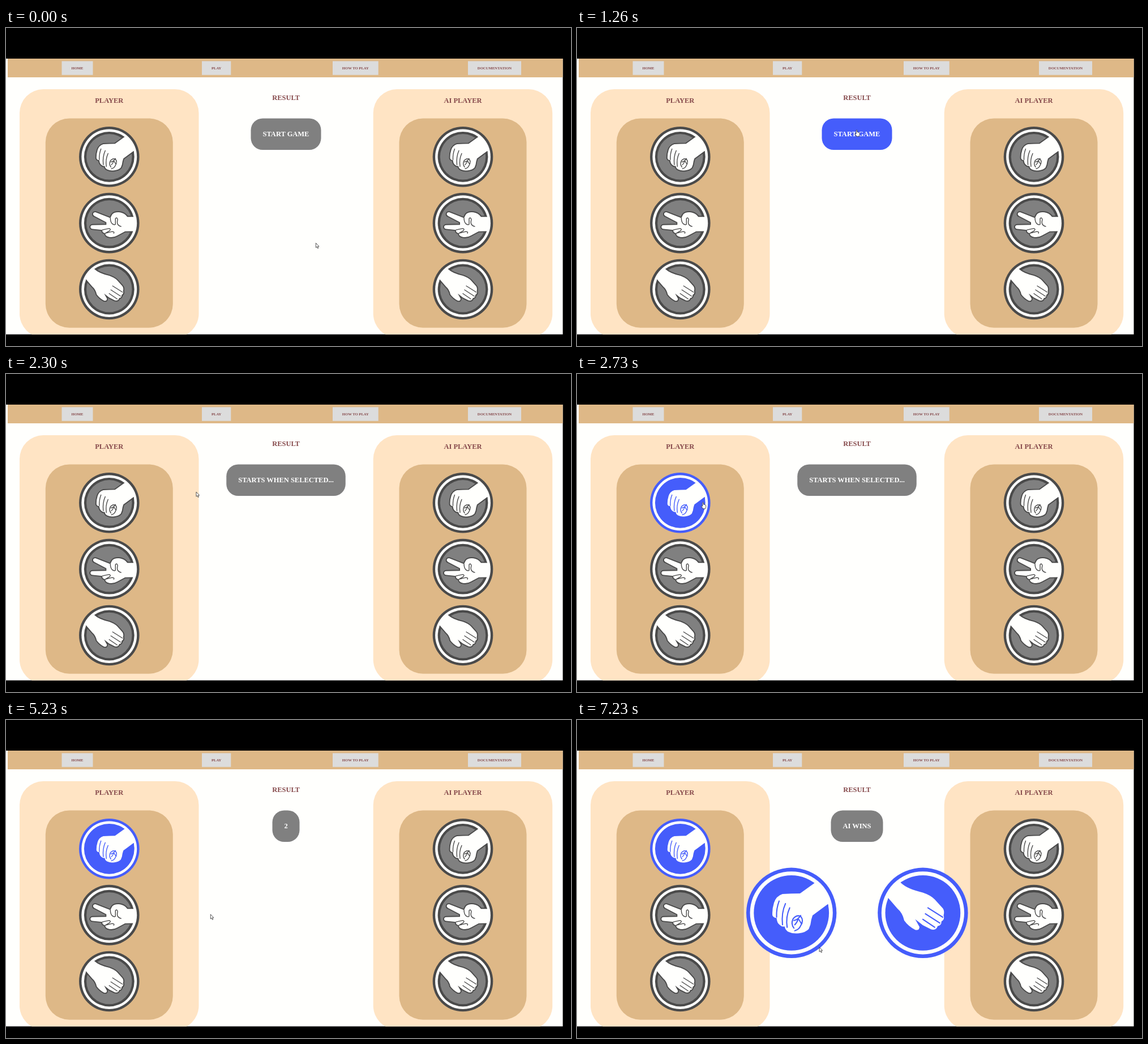
An HTML page for the animation above (8 s loop, 998 by 561 pixels).

```html
<!DOCTYPE html>
<html lang="en">
<head>
<meta charset="utf-8">
<title>Rock paper scissors</title>
<style>
html, body { margin: 0; width: 100%; height: 100%; overflow: hidden; background: #000; }
svg { display: block; width: 100vw; height: 100vh; }
text { font: bold 12.48px "Liberation Serif", "Times New Roman", serif; text-anchor: middle; fill: #85484a; }
.nav text { font-size: 6.65px; }
.icon { color: #4a4a4a; --disc: #808080; }
.icon.on { color: #455dfb; --disc: #455dfb; }
.line { fill: none; stroke: currentColor; stroke-width: 1.4; stroke-linecap: round; stroke-linejoin: round; }
.edge { fill: none; stroke: currentColor; stroke-width: 3.8; stroke-linejoin: round; }
.cursor path { fill: #fff; stroke: #222; stroke-width: .75; stroke-linejoin: round; }
</style>
</head>
<body>
<svg id="stage" viewBox="0 0 998 561"></svg>
<script>
const HANDS = {
  rock: {
    shape: 'M40 -45L27 -35L10.2 -23Q0 -23 -10.5 -22.3Q-18 -20 -20.5 -12Q-23 -4 -22.4 3Q-21 6 -17.5 6Q-17 12 -14 14Q-11 17 -8 16Q-7 21 -3 22.5Q2 25 9 24Q17 23 20.5 19Q23 14 23.5 8L25 3L44 -11L55 -19Z',
    lines: 'M-14.5 -14Q-18 -5 -17.5 5M-7 -11Q-12 0 -10.5 14M-2 -6Q-7 5 -5 17M3 18Q-1 13 2 7Q6 2 11 4Q15 9 11 15Q9 20 4 21M3 9Q8 8 11 3M8 7Q7 11 4 14M9 8L12 13'
  },
  scissors: {
    shape: 'M55 -11L32 -11Q27 -18 19 -19Q9 -20 5 -15L2 -9L-23.5 -19Q-28 -19.5 -28.5 -16Q-28.5 -13.5 -26 -12.5L-5 -1.5L-5 3L-29.5 3.5Q-33.5 4 -33 7.5Q-32.5 10 -29 10.3L-12 12Q-13 17 -7 18Q-7 23 0 24.5Q7 26 14 22L28 14.5L55 14Z',
    lines: 'M2 -9Q2 -3 5 1Q9 4 11 2L11 -8Q14 -11 15 -6Q12 4 21 6M-12 12L0 9.5Q4 11 0 14L-7 18L5 15Q10 15 8 18'
  },
  paper: {
    shape: 'M-34 -43L-26 -35.5Q-18 -28 0 -24Q9 -21 14 -16L23 -6Q26 -3 24.5 3Q26 8 22 10Q22 15 17.5 15.5Q16 21 10 19.5L0 14.5L-9 7.5L-4 16.5Q-4 21 -9 20Q-17 16 -22 9Q-24 0 -30 -5L-42 -19L-54 -32Z',
    lines: 'M6 -6L23.5 5M3 1L20 12M0 7.5L14 17'
  }
};
const NAV = [['HOME', 98.5, 55], ['PLAY', 346, 51.3], ['HOW TO PLAY', 577, 80.7], ['DOCUMENTATION', 816, 94]];
const PANEL_GAP = 624.7, LOOP = 8000, SIZE = 1.495;

// Each move: start time, end time, start point, end point
const MOVES = [
  [510, 830, [547, 379], [511, 224]],
  [1110, 1260, [511, 224], [494, 179.5]],
  [1710, 1800, [494, 179.5], [490, 185.5]],
  [2045, 2500, [490, 185.5], [230, 223]],
  [2660, 2930, [230, 223], [187, 240.5]],
  [3885, 4220, [187, 240.5], [361, 342.5]],
  [5740, 6060, [361, 342.5], [427.8, 400.5]]
];
const LABELS = [
  [0, 'START GAME', 124], [1530, 'STARTS WHEN SELECTED...', 210.5],
  [4215, '3', 48], [5230, '2', 48], [6230, '1', 48], [7230, 'AI WINS', 92]
];

const rect = (x, y, w, h, r, fill, extra = '') =>
  `<rect x="${x}" y="${y}" width="${w}" height="${h}" rx="${r}" fill="${fill}" ${extra}/>`;
const text = (x, y, label, extra = '') => `<text x="${x}" y="${y}" ${extra}>${label}</text>`;
const disc = (r, fill) => `<circle r="${r}" fill="${fill}"/>`;

function icon(kind, x, y, scale = 1, extra = '') {
  const { shape, lines } = HANDS[kind];
  return `<g class="icon${scale > 1 ? ' on' : ''}" transform="translate(${x} ${y}) scale(${scale})" ${extra}>
    ${disc(53.3, 'currentColor')}${disc(48.9, '#fffffd')}${disc(44.4, 'currentColor')}${disc(40.2, 'var(--disc)')}
    <g clip-path="url(#inner)"><path class="edge" d="${shape}"/></g>
    <g clip-path="url(#outer)"><path d="${shape}" fill="#fffffd"/></g>
    <path class="line" d="${lines}"/></g>`;
}

function panel(x, title, id) {
  return `<g id="${id}" transform="translate(${x} 0)">
    ${rect(24, 108, 316.5, 438, 42, '#ffe4c4')}${rect(69.8, 159.5, 225, 369.2, 42, '#deb887')}
    ${text(182.3, 131.5, title)}
    ${Object.keys(HANDS).map((kind, i) => icon(kind, 182.3, 227.3 + 116.85 * i)).join('')}</g>`;
}

const stage = document.getElementById('stage');
stage.innerHTML = `
  <defs>
    <clipPath id="inner"><circle r="44.4"/></clipPath>
    <clipPath id="outer"><circle r="46.5"/></clipPath>
    <clipPath id="page"><rect y="54" width="983.5" height="486.5"/></clipPath>
  </defs>
  <rect width="998" height="561"/>
  <g clip-path="url(#page)">
    ${rect(0, 54, 984, 487, 0, '#fffffd')}${rect(3, 54, 981, 33, 0, '#deb887')}
    <g class="nav">${NAV.map(([label, x, w]) =>
      rect(x, 58.5, w, 24.3, 0, '#dcdcdc') + text(x + w / 2, 72.8, label)).join('')}</g>
    ${panel(0, 'PLAYER', 'player')}${panel(PANEL_GAP, 'AI PLAYER', 'ai')}
    ${text(494.5, 127.4, 'RESULT')}
    ${rect(0, 159.5, 0, 55.5, 20.8, '#808080', 'id="button"')}
    ${text(494.5, 191.3, '', 'id="label" style="fill:#fff"')}
    <g id="outcome">${icon('rock', 378.7, 340.3, SIZE)}${icon('paper', 610.9, 340.3, SIZE)}</g>
    <g id="cursor" class="cursor">
      <path id="arrow" d="M.3 .3V8.4L2.1 6.8L3.5 9.8L4.8 9.2L3.5 6.3H5.9Z"/>
      <path id="pointer" d="M-.9 7V1Q0 -.4 .9 1V4.2Q1.8 3.6 2.5 4.6Q3.5 4.1 4 5.1Q5 4.9 5 6V8.6Q4.8 10 4 11.7H-.2Q-1.3 9.5 -3 7.6Q-2.8 6 -.9 7.3Z"/>
    </g>
  </g>`;

const el = id => document.getElementById(id);
const show = (node, visible) => node.setAttribute('visibility', visible ? 'visible' : 'hidden');
const rock = el('player').querySelector('.icon');

function cursorAt(t) {
  let point = MOVES[0][2];
  for (const [start, end, from, to] of MOVES) {
    if (t < start) break;
    const u = Math.min(1, (t - start) / (end - start));
    const k = u * u * (3 - 2 * u);
    point = from.map((v, i) => v + (to[i] - v) * k);
  }
  return point;
}

function draw(t) {
  const [x, y] = cursorAt(t);
  const [, label, width] = LABELS.filter(([start]) => t >= start).pop();
  const overButton = Math.abs(x - 494.5) < width / 2 && y > 159.5 && y < 215;
  const overRock = Math.hypot(x - 182.3, y - 227.3) < 53.3;

  el('button').setAttribute('x', 494.5 - width / 2);
  el('button').setAttribute('width', width);
  el('button').setAttribute('fill', overButton ? '#455dfb' : '#808080');
  el('label').textContent = label;
  rock.classList.toggle('on', overRock || t > 3800);
  show(el('outcome'), t >= 7230);
  show(el('arrow'), !overButton && !overRock);
  show(el('pointer'), overButton || overRock);
  el('cursor').setAttribute('transform', `translate(${x} ${y})`);
}

const origin = performance.now();
function tick() {
  draw((performance.now() - origin) % LOOP);
  requestAnimationFrame(tick);
}
tick();
</script>
</body>
</html>
```
